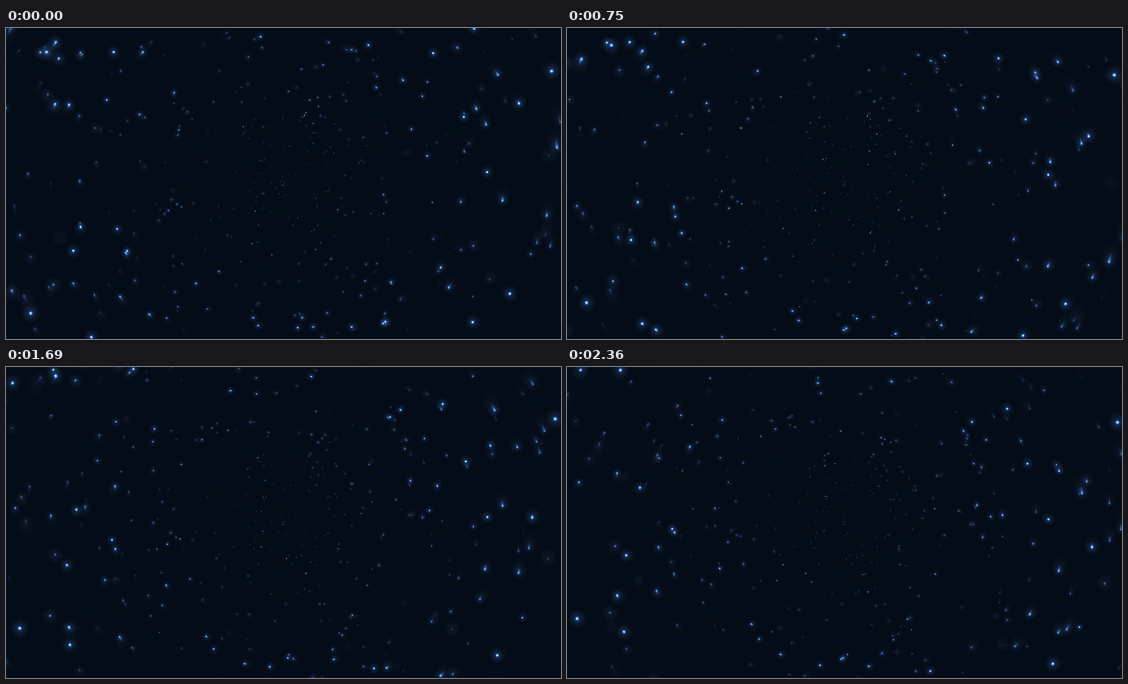
These frames come from a looping animation (834 by 468 pixels, 2.41 s). An HTML page with a canvas:

```html
<!DOCTYPE html>
<html lang="en">
<head>
<meta charset="utf-8">
<title>Star orbits</title>
<style>
  html, body { margin: 0; height: 100%; overflow: hidden; background: #040c17; }
  canvas { display: block; }
</style>
</head>
<body>
<canvas id="sky" width="834" height="468"></canvas>
<script>
const W = 834, H = 468, CX = W / 2, CY = H / 2;
const LOOP = 2410, STEPS = 51;
const TRAIL = 7, FADE = 0.5, SUBSTEPS = 3.4;
const ctx = document.getElementById('sky').getContext('2d');

// Bright stars: start x, start y, degrees travelled per loop
const BRIGHT = [
  [37, 429, 7.4], [820, 65, 2.6], [383, 13, 27.3], [253, 97, 39.5],
  [74, 114, 44], [95, 115, 33], [61, 36, 5.2], [75, 21, 50],
  [206, 36, 47.7], [162, 36, 11], [112, 299, 21.8], [167, 302, 13.2],
  [101, 335, 9.2], [180, 338, 50], [182, 335, 20], [285, 384, 28.5],
  [128, 465, 12.3], [173, 497, 29.4], [371, 436, 29.7], [445, 436, 8.5],
  [438, 451, 15.3], [461, 450, 37.5], [519, 450, 20.6], [570, 442, 6.4],
  [566, 445, 42], [701, 443, 13], [757, 400, 8.2], [653, 361, 36.8],
  [665, 391, 54], [578, 383, 37.8], [723, 217, 2.3], [746, 260, 55.4],
  [707, 122, 47.6], [771, 114, 24.5], [828, 180, 75], [597, 79, 38.2],
  [642, 38, 6.1], [545, 26, 20.2], [688, 134, 2.4], [557, 90, 38.5],
  [-13, 154, 46.5], [637, -12, 61], [467, -122, 75]
];

let seed = 217;
function random(min, max) {
  seed = (seed * 1664525 + 1013904223) % 4294967296;
  return min + (max - min) * seed / 4294967296;
}

function brightStar([x, y, degrees]) {
  const orbit = Math.hypot(x - CX, y - CY);
  return {
    orbit, angle: Math.atan2(y - CY, x - CX),
    speed: degrees * Math.PI / 180 / (STEPS - 1),
    size: orbit / 14, alpha: 0.9, twinkle: 0, phase: 0
  };
}

function randomStar() {
  const orbit = random(0, 590);
  return {
    orbit, angle: random(0, 2 * Math.PI),
    speed: random(0, orbit) * 6.8e-5,
    size: random(60, orbit) / 14, alpha: random(0.15, 0.85),
    twinkle: 0.15, phase: random(0, 2 * Math.PI)
  };
}

const stars = [...BRIGHT.map(brightStar), ...Array.from({ length: 600 }, randomStar)];

function makeGlow() {
  const glow = document.createElement('canvas');
  glow.width = glow.height = 100;
  const g = glow.getContext('2d');
  const fill = g.createRadialGradient(50, 50, 0, 50, 50, 50);
  fill.addColorStop(0.025, '#fff');
  fill.addColorStop(0.1, 'hsl(217, 61%, 33%)');
  fill.addColorStop(0.25, 'hsl(217, 64%, 6%)');
  fill.addColorStop(1, 'transparent');
  g.fillStyle = fill;
  g.arc(50, 50, 50, 0, 2 * Math.PI);
  g.fill();
  return glow;
}
const glow = makeGlow();

function drawStar(star, step) {
  const { orbit, angle, speed, size, alpha, twinkle, phase } = star;
  const light = Math.max(0, alpha + twinkle * Math.sin(phase + step * 0.06));
  for (let k = 0; k < TRAIL; k++) {
    const a = angle + speed * (step - k / SUBSTEPS);
    const x = CX + orbit * Math.cos(a), y = CY + orbit * Math.sin(a);
    ctx.globalAlpha = light * FADE ** k;
    ctx.drawImage(glow, x - size / 2, y - size / 2, size, size);
  }
}

function draw(step) {
  ctx.globalCompositeOperation = 'source-over';
  ctx.globalAlpha = 1;
  ctx.fillStyle = '#040c17';
  ctx.fillRect(0, 0, W, H);
  ctx.globalCompositeOperation = 'lighter';
  for (const star of stars) drawStar(star, step);
}

let shown = -1;
const start = performance.now();
function tick() {
  const time = (performance.now() - start) % LOOP;
  const step = Math.min(STEPS - 1, Math.floor(time / LOOP * STEPS + 0.25));
  if (step !== shown) draw(shown = step);
  requestAnimationFrame(tick);
}
tick();
</script>
</body>
</html>
```
